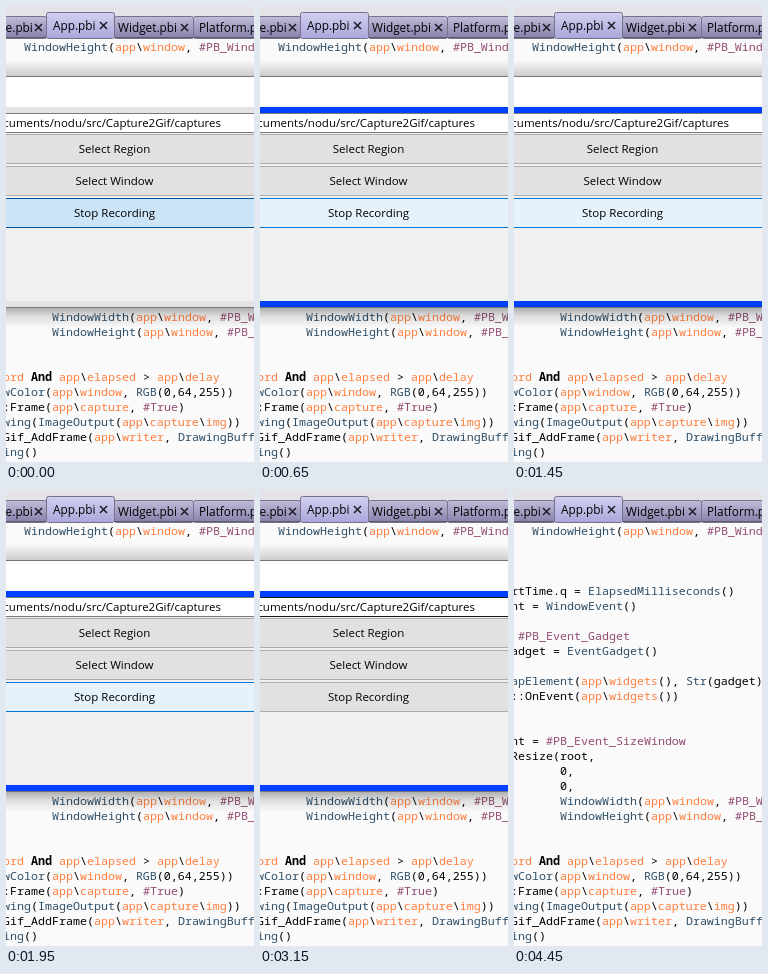
An HTML page for the animation above (8 s loop, 248 by 456 pixels).

```html
<!DOCTYPE html>
<html lang="en">
<head>
<meta charset="utf-8">
<title>Screen recording</title>
<style>
  html, body { margin: 0; width: 100%; height: 100%; overflow: hidden; background: #fafafa; }
  svg { display: block; width: 248px; height: 456px; }
  text { white-space: pre; }
  .ui { font: 11.5px "Open Sans", "Noto Sans", sans-serif; fill: #000; }
  .tab { font-size: 11.8px; }
  .code { font: 11.667px "Noto Sans Mono", "DejaVu Sans Mono", monospace; fill: #000; }
  .field { fill: #ff7f3f; }
  .const { fill: #924b72; }
  .word { font-weight: bold; }
  .call { fill: #2f4f68; }
</style>
</head>
<body>
<svg id="stage" viewBox="0 0 248 456">
  <defs>
    <linearGradient id="idle" x2="0" y2="1">
      <stop stop-color="#c0bcda"/><stop offset="1" stop-color="#8681ab"/>
    </linearGradient>
    <linearGradient id="active" x2="0" y2="1">
      <stop stop-color="#d2d0ef"/><stop offset="1" stop-color="#aaa7dc"/>
    </linearGradient>
    <linearGradient id="above" x2="0" y2="1">
      <stop stop-color="#000" stop-opacity="0"/><stop offset="1" stop-color="#000" stop-opacity=".18"/>
    </linearGradient>
    <linearGradient id="below" x2="0" y2="1">
      <stop stop-color="#000" stop-opacity=".3"/><stop offset=".4" stop-color="#000" stop-opacity=".12"/>
      <stop offset="1" stop-color="#000" stop-opacity="0"/>
    </linearGradient>
  </defs>
  <rect width="248" height="456" fill="#fafafa"/>
  <g id="code"></g>
  <g id="tabs"></g>
  <g id="win"></g>
</svg>
<script>
const LOOP = 8000, STEP = 50;
const $ = id => document.getElementById(id);

function add(parent, tag, attrs, text) {
  const el = document.createElementNS("http://www.w3.org/2000/svg", tag);
  for (const k in attrs) el.setAttribute(k, attrs[k]);
  if (text !== undefined) el.textContent = text;
  parent.appendChild(el);
  return el;
}
const box = (parent, x, y, width, height, fill, more) =>
  add(parent, "rect", { x, y, width, height, fill, ...more });

// Row, start column and text of each code line
const LINES = [
  [0, 3, "WindowHeight(app\\window, #PB_Window_InnerCoordinate)"],
  [4, -3, "StartTime.q = ElapsedMilliseconds()"],
  [5, -3, "Event = WindowEvent()"],
  [7, 1, "#PB_Event_Gadget"],
  [8, -1, "gadget = EventGadget()"],
  [10, -5, "FindMapElement(app\\widgets(), Str(gadget))"],
  [11, 0, "::OnEvent(app\\widgets())"],
  [14, -3, "Event = #PB_Event_SizeWindow"],
  [15, 0, "Resize(root,"],
  [16, 7, "0,"],
  [17, 7, "0,"],
  [18, 7, "WindowWidth(app\\window, #PB_Window_InnerCoordinate),"],
  [19, 7, "WindowHeight(app\\window, #PB_Window_InnerCoordinate))"],
  [22, -7, "app\\record And app\\elapsed > app\\delay"],
  [23, -8, "SetWindowColor(app\\window, RGB(0,64,255))"],
  [24, -1, "::Frame(app\\capture, #True)"],
  [25, -8, "StartDrawing(ImageOutput(app\\capture\\img))"],
  [26, 0, "Gif_AddFrame(app\\writer, DrawingBuffer())"],
  [27, -8, "StopDrawing()"]
];
const TOKEN = /(?<field>\bapp\b|(?<=\\)\w+)|(?<const>#\w+)|(?<word>\bAnd\b)|(?<call>\b(?:Window\w+|ElapsedMilliseconds|EventGadget|\w*MapElement|Str|SetWindowColor|RGB|\w+Drawing|ImageOutput|DrawingBuffer)(?=\())|[\w.]+|[^\w#]/g;

for (const [row, col, source] of LINES) {
  const line = add($("code"), "text", { class: "code", x: -3 + 7 * col, y: 45 + 15 * row });
  for (const m of source.matchAll(TOKEN)) {
    const kind = Object.keys(m.groups).find(k => m.groups[k]);
    add(line, "tspan", kind ? { class: kind } : {}, m[0]);
  }
}

// Editor tabs: left, width, label left, label, centre of the cross
const tabs = $("tabs");
box(tabs, 0, 0, 248, 32, "#e4e3e7");
const TABS = [
  [-40, 80, -7, "ee.pbi", 32],
  [108, 79, 112, "Widget.pbi", 178],
  [187, 90, 193, "Platform.pbi", 270],
  [40, 68, 47, "App.pbi", 97]
];
for (const [x, w, textX, name, crossX] of TABS) {
  const on = name === "App.pbi", y = on ? 6 : 10;
  box(tabs, x + .5, y + .5, w, 32 - y, on ? "url(#active)" : "url(#idle)", { stroke: "#77728a", rx: 2 });
  add(tabs, "text", { class: "ui tab", x: textX, y: on ? 24 : 26 }, name);
  add(tabs, "path", {
    d: `M${crossX - 3} ${on ? 16 : 18}l7 7m0-7l-7 7`,
    fill: "none", stroke: "#1c1a24", "stroke-width": 1.5
  });
}
box(tabs, 0, 31, 248, 1, "#5f5b72");
box(tabs, 41, 31, 67, 1, "#aaa7dc");

// Recorder window
const win = $("win");
const band = (y, h, fill) => box(win, -60, y, 368, h, fill);
band(54, 16, "url(#above)");
band(302, 20, "url(#below)");
band(70, 232, "#777");
band(71, 230, "#f0f0f0");
band(71, 30, "#fff");
const rims = [band(101, 6), band(295, 6)];

const gadgets = add(win, "g", {});
const path = box(gadgets, -59.5, 107.5, 368, 19, "#fff");
add(gadgets, "text", { class: "ui", x: 215, y: 121, "text-anchor": "end" },
  "Documents/nodu/src/Capture2Gif/captures");
const buttons = ["Select Region", "Select Window", "Stop Recording"].map((label, i) => {
  const y = 128 + 32 * i;
  const face = box(gadgets, -59.5, y + .5, 368, 29, "#e1e1e1", { stroke: "#adadad" });
  add(gadgets, "text", { class: "ui", x: 108.5, y: y + 19, "text-anchor": "middle" }, label);
  return face;
});
const stop = buttons[2];

// [time, face, outline] of the stop button
const FACE = [
  [0, [204, 228, 247], [0, 84, 153]],
  [250, [229, 241, 251], [0, 120, 215]],
  [2050, [229, 241, 251], [0, 120, 215]],
  [2850, [225, 225, 225], [173, 173, 173]],
  [LOOP, [225, 225, 225], [173, 173, 173]]
];
const FADE = [[4300, .65], [4350, .35], [4400, .12], [4450, 0]];

const mix = (a, b, p) => `rgb(${a.map((v, i) => Math.round(v + (b[i] - v) * p))})`;

function draw(t) {
  const i = FACE.findIndex((k, n) => n && t < k[0]);
  const a = FACE[i - 1], b = FACE[i], p = (t - a[0]) / (b[0] - a[0]);
  stop.setAttribute("fill", mix(a[1], b[1], p));
  stop.setAttribute("stroke", mix(a[2], b[2], p));

  for (const rim of rims) rim.setAttribute("fill", t >= 250 ? "#0040ff" : "#e3e3e3");
  path.setAttribute("stroke", t >= 3150 && t < 3900 ? "#171717" : "#7a7a7a");
  gadgets.style.display = t >= 250 && t < 300 ? "none" : "";

  let alpha = 1;
  for (const [at, v] of FADE) if (t >= at) alpha = v;
  const s = .92 + .08 * alpha;
  win.setAttribute("opacity", alpha);
  win.setAttribute("transform", `translate(${108.5 * (1 - s)} ${185 * (1 - s)}) scale(${s})`);
}

const start = performance.now();
function tick() {
  const t = (performance.now() - start) % LOOP;
  draw(Math.floor(t / STEP) * STEP);
  requestAnimationFrame(tick);
}
tick();
</script>
</body>
</html>
```
